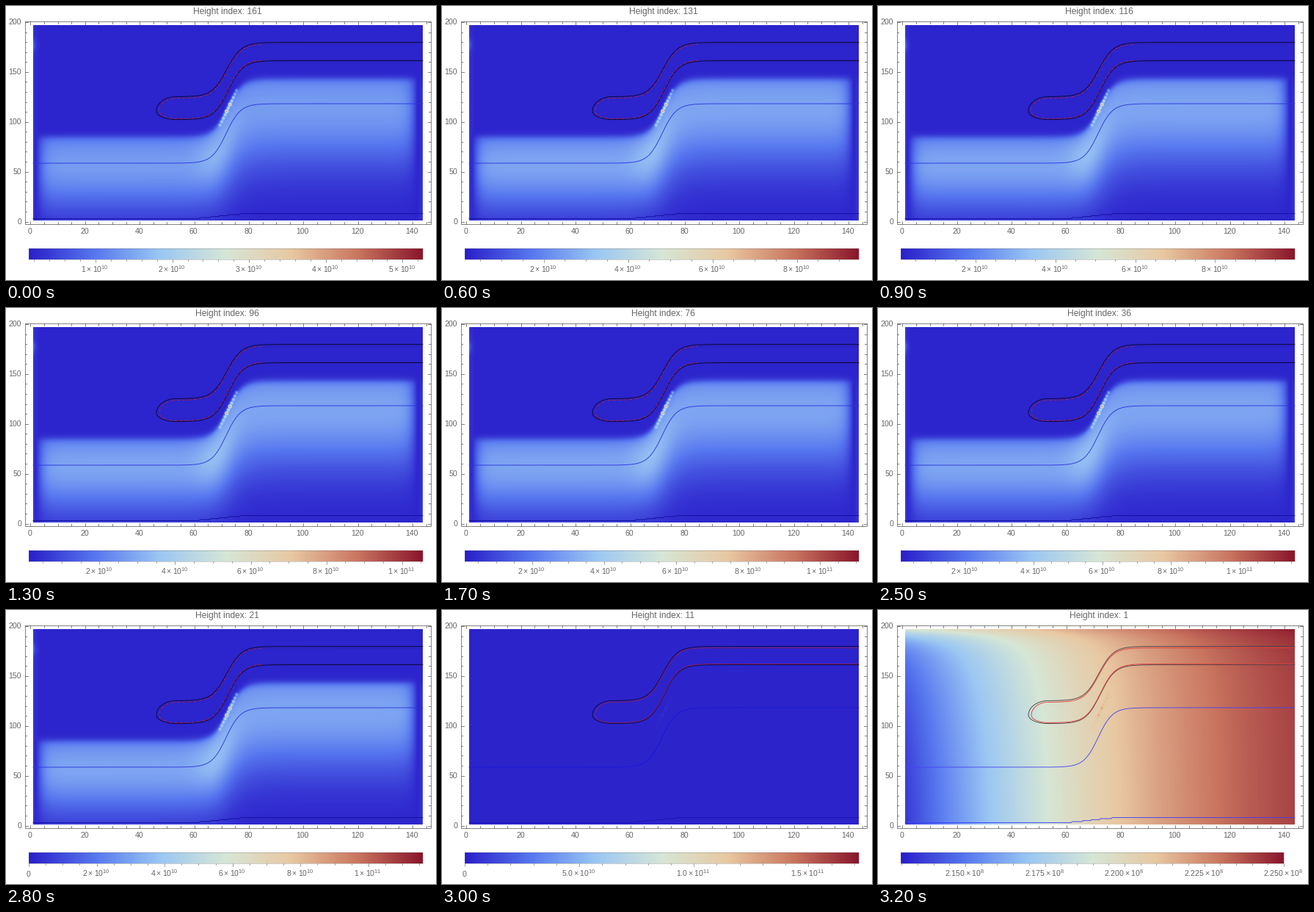
A matplotlib script that plays this animation: 586x373 px, repeating every 3.3 s.

```python
import numpy as np
import matplotlib.pyplot as plt
from matplotlib.animation import FuncAnimation
from matplotlib.colors import LinearSegmentedColormap

W, H, DPI = 586, 373, 64
PX = 72 / DPI                      # points per pixel
FRAMES, INTERVAL = 33, 100
GRAY = "0.4"

plt.rcParams.update({
    "font.family": "Liberation Sans",
    "mathtext.fontset": "custom",
    "mathtext.rm": "Liberation Sans",
    "mathtext.default": "rm",
})

THERMO = LinearSegmentedColormap.from_list("thermo", [
    "#2a1fca", "#5777ef", "#9bc7f3", "#d6e6d6", "#e8c8a2", "#ca7761",
    "#8a162b"], N=512)

# plot area and legend bar, in pixels
X0, X1, Y0, Y1 = 37, 568, 26, 292
BAR_L, BAR_R, BAR_T, BAR_B = 31, 568, 330, 345


def px(x):
    return 32.5 + 3.718 * x


def py(y):
    return 293.5 - 1.3575 * y


def rise(x, lo, hi, c, w):
    return lo + (hi - lo) * (1 + np.tanh((x - c) / w)) / 2


def bell(x, c, w):
    return np.exp(-((x - c) / w) ** 2)


# ---- fields -------------------------------------------------------------
X, Y = np.meshgrid(np.arange(X0, X1) + 0.5, np.arange(Y0, Y1) + 0.5)


def layer_field():
    top = rise(X, 178, 99, 302, 20)
    q = np.clip((Y - top) / (291 - top), 0, 1)
    s = rise(X, 0, 1, 302, 30)
    body = .235 * bell(q, .33 - .13 * s, .55 - .13 * s)
    body += .05 * bell(X, 284, 26) * bell(q, .25, .35)
    body *= rise(Y, 0, 1, top, 5)
    body *= np.tanh((X - 41).clip(0) / 12) * np.tanh((561 - X).clip(0) / 12)
    rim = np.exp(-(X - X0) / 3) * (.04 + .1 * bell(Y, 53, 8))
    return body + rim + .05 * np.exp(-(X1 - X) / 3) * rise(Y, 0, 1, 100, 12)


def hot_spots():
    f = np.zeros_like(X)
    for i in range(11):
        y = 115 + 4.7 * i
        a = (.34 if i in (4, 6) else 0) + .33 * bell(y, 137, 30)
        f += a * bell(X, 303 - .48 * (y - 138), 2) * bell(Y, y, 2.1)
    return f


def base_field():
    v, d = (X - X0) / (X1 - X0), Y - Y0
    u = .04 + 1.45 * v - .57 * v ** 2
    u += (1 - u) ** 1.5 * (.30 * np.exp(-d / 12) + .20 * np.exp(-d / 90))
    return u + .06 * u ** 2 * np.exp(-d / 25) + .15 * SPOTS


LAYERS, SPOTS = layer_field(), hot_spots()
BASE = base_field()

# ---- contour lines ------------------------------------------------------


def outline(d_top, d_cap, d_low):
    """Tongue-shaped contour, inset by the given pixels."""
    xs = np.linspace(X1, 232, 200)
    up = rise(xs, 123.5, 49.5, 301, 20) + d_top
    low = rise(xs, 154.7, 74.6, 303, 20) - d_low
    t = np.linspace(0, np.pi, 60)
    tip = 143
    half = np.where(t < np.pi / 2, tip - up[-1], low[-1] - tip)
    cx = 232 - (27 - d_cap) * np.sin(t)
    cy = tip - half * np.cos(t)
    return np.r_[xs, cx, xs[::-1]], np.r_[up, cy, low[::-1]]


OUTER, INNER = outline(0, 0, 0), outline(2, 4, 1.2)
LINE_X = np.linspace(X0, X1, 400)
MIDDLE = rise(LINE_X, 214, 133, 300, 19.5)
FLOOR = py(np.round(rise(LINE_X, 2.7, 8.2, 290, 30)))

# ---- stage --------------------------------------------------------------
fig = plt.figure(figsize=(W / DPI, H / DPI), dpi=DPI, facecolor="white")
ax = fig.add_axes([0, 0, 1, 1])
ax.axis("off")


def label(x, y, s, size=10.5, ha="center", va="center"):
    return ax.text(x, y, s, fontsize=size * PX, color=GRAY, ha=ha, va=va)


def line(x, y, color=GRAY, w=0.8, **kw):
    return ax.plot(x, y, color=color, lw=w * PX, **kw)[0]


def shade(data, extent):
    return ax.imshow(data, cmap=THERMO, vmin=0, vmax=1, extent=extent,
                     interpolation="nearest", aspect="auto", zorder=1)


def draw_axes(l=25.5, r=578.5, t=21, b=296.5):
    line([l, r, r, l, l], [t, t, b, b, t])
    for v in range(0, 147, 5):
        n = 4 if v % 20 == 0 else 2.5
        x = round(px(v)) + .5
        line([x, x], [b, b - n])
        line([x, x], [t, t + n])
        if v % 20 == 0:
            label(px(v), 307, str(v))
    for v in range(0, 201, 10):
        n = 4 if v % 50 == 0 else 2.5
        y = round(py(v)) - .5
        line([l, l + n], [y, y])
        line([r, r - n], [y, y])
        if v % 50 == 0:
            label(21, py(v) - .7, str(v), ha="right", va="center_baseline")


draw_axes()
picture = shade(BASE, (X0, X1, Y1, Y0))
bar = shade(np.linspace(0, 1, BAR_R - BAR_L)[None], (BAR_L, BAR_R, BAR_B, BAR_T))
title = label(301.5, 11.5, "", 12, va="baseline")
ax.set_xlim(0, W)
ax.set_ylim(H, 0)
ax.set_autoscale_on(False)

moving = []


def sci(v, exp, digits):
    if v == 0:
        return "0"
    if v >= 10:
        v, exp = v / 10, exp + 1
    return rf"${v:.{digits}f}\times10^{{{exp}}}$"


def legend(lo, hi, major, ratio, exp, digits, right=BAR_R):
    bar.set_extent((BAR_L, right, BAR_B, BAR_T))
    moving.append(line([BAR_L, right, right, BAR_L, BAR_L],
                       [BAR_T, BAR_T, BAR_B, BAR_B, BAR_T], w=.5, alpha=.6))
    k, minor = (right - BAR_L) / (hi - lo), major / ratio
    first, last = np.ceil(lo / minor - 1e-6), np.floor(hi / minor + 1e-6)
    for i in range(int(first), int(last) + 1):
        x = BAR_L + k * (i * minor - lo)
        big = i % ratio == 0
        moving.append(line([x, x], [BAR_B, BAR_B + (3.5 if big else 2)], w=.6))
        if big:
            moving.append(label(x - .7, 363, sci(i * minor, exp, digits),
                                va="baseline"))


def contours(dark, red, blue, floor, dashed=False):
    moving.append(line(LINE_X, MIDDLE, blue, .9, zorder=3))
    moving.append(line(LINE_X, FLOOR, floor, .9, zorder=3))
    moving.append(line(*OUTER, dark, .9, zorder=3))
    x, y = INNER
    if dashed:
        moving.append(line(x, y, "#241a78", .5, zorder=3, alpha=.7))
        y = np.where(x < 350, y, np.nan)
    style = (0, (3.5, 2.2, 1.2, 1.6)) if dashed else "-"
    moving.append(line(x, y, red, .9, zorder=4, ls=style))


def update(k):
    while moving:
        moving.pop().remove()
    index = 161 - 5 * k
    title.set_text(f"Height index: {index}")
    if index == 1:
        picture.set_data(BASE)
        legend(2.1297, 2.25, .025, 5, 8, 3, right=553)
        contours("#48444c", "#e0403a", "#4646f0", "#3c3cf4")
    elif index <= 11:
        picture.set_data(.008 + .04 * SPOTS)
        legend(0, 17.2, 5, 5, 10, 1)
        contours("#0c0838", "#8c1c58", "#1c16dc", "#1810b4")
    else:
        surface = np.exp((index - 161) / 10)
        picture.set_data(.01 + (1.08 - .08 * surface) * LAYERS + SPOTS)
        lo = .13 if index > 21 else 0
        hi = min(11.6, 13.05 - .026 * index) - 3.6 * surface
        major, ratio = (1, 5) if hi < 6 else (2, 4)
        legend(lo, hi, major, ratio, 10, 0)
        contours("#0a0630", "#c02040", "#2c36dc", "#140c9c", dashed=True)
    return []


anim = FuncAnimation(fig, update, frames=FRAMES, interval=INTERVAL,
                     init_func=lambda: update(0), repeat=True, repeat_delay=0,
                     blit=False)
plt.show()
```
